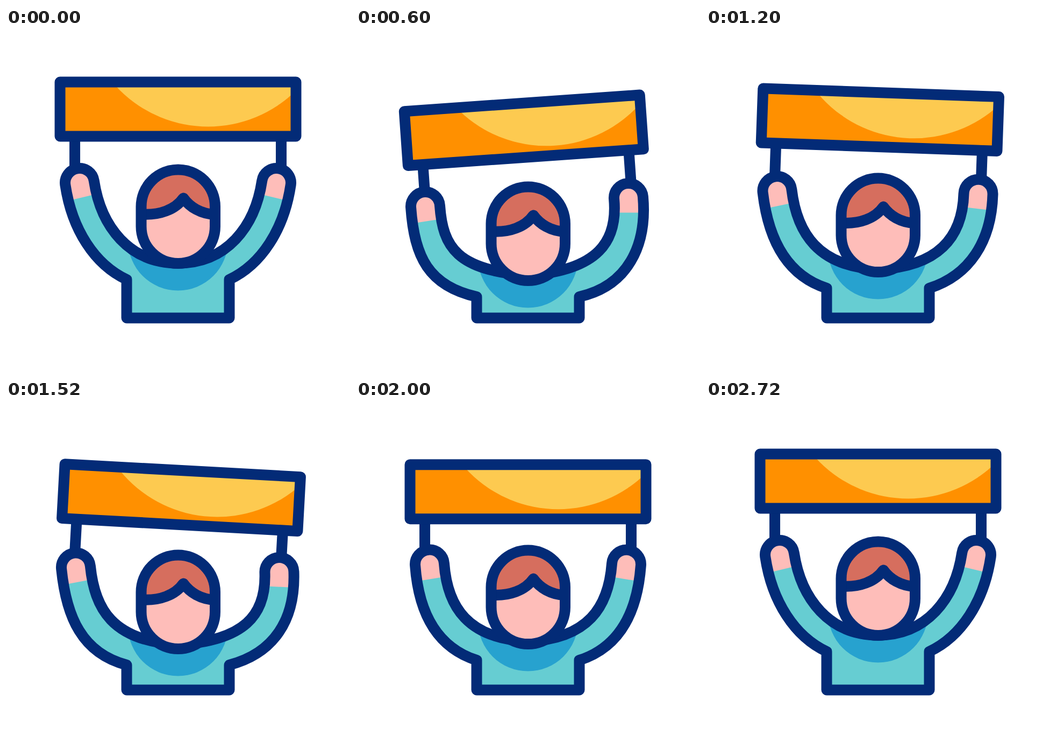
Write an HTML page that moves like this. It is 640 px wide and 640 px high and loops after 2800 ms.

```html
<!DOCTYPE html>
<html lang="en">
<head>
<meta charset="utf-8">
<title>Fan with banner</title>
<style>
  html, body { margin: 0; width: 100%; height: 100%; overflow: hidden; background: #fff; }
  svg { display: block; width: 100vw; height: 100vh; }
  .line { fill: none; stroke: #032b77; stroke-width: 20; stroke-linejoin: round; }
</style>
</head>
<body>
<svg viewBox="0 0 640 640">
  <defs>
    <path id="body"/>
    <clipPath id="inBody"><use href="#body"/></clipPath>
    <clipPath id="inBanner"><path d="M100.5 100.5h439v101h-439z"/></clipPath>
    <clipPath id="inHead"><rect x="251.5" y="263.5" width="137.5" height="174.5" rx="68.7"/></clipPath>
  </defs>

  <g id="banner">
    <path class="line" d="M128 201V262M512 201V262"/>
    <path fill="#ff9000" d="M100.5 100.5h439v101h-439z"/>
    <circle cx="376" cy="-49.5" r="233" fill="#fdca50" clip-path="url(#inBanner)"/>
    <path class="line" d="M100.5 100.5h439v101h-439z"/>
  </g>

  <g clip-path="url(#inBody)">
    <use href="#body" fill="#66cdd2"/>
    <circle id="collar" cx="320" cy="395.5" r="93" fill="#27a2cf"/>
    <rect id="leftHand" x="-40" y="-40" width="80" height="67.5" fill="#febdb9"/>
    <rect id="rightHand" x="-40" y="-40" width="80" height="67.5" fill="#febdb9"/>
  </g>
  <use href="#body" class="line"/>

  <g id="head">
    <g clip-path="url(#inHead)">
      <path fill="#febdb9" d="M240 250h160v200h-160z"/>
      <path class="line" style="fill:#d66e5e"
        d="M240 250V346.5H251.5C285 349 315 338 330 316.5C342 333 362 346 389 347H400V250z"/>
    </g>
    <rect class="line" x="251.5" y="263.5" width="137.5" height="174.5" rx="68.7"/>
  </g>
</svg>

<script>
const LOOP = 2800, START = 200, BOUNCE = 800, DROP = 32, BANNER_DROP = 39;
const $ = id => document.getElementById(id);
const mix = (a, b, k) => a + (b - a) * k;
const smooth = x => x * x * (3 - 2 * x);

// Hand pose: x, y, lean in degrees. The right hand is given mirrored.
const RAISED = [137, 288, 8.5];
const BOUNCES = [
  { tilt: -4, left: [129, 332, 4], right: [133, 316, -5] },
  { tilt: 4, left: [128, 318, 5], right: [130, 329, -5] },
  { tilt: 0, left: [137, 323, 0], right: [137, 323, 0] }
];

// Points from the waist corner around the hand to the neck.
function armPoints([x, y, lean], k) {
  const a = lean * Math.PI / 180, s = Math.sin(a), c = Math.cos(a);
  const outer = [x - 27 * c, y + 27 * s], inner = [x + 27 * c, y - 27 * s];
  const along = ([px, py], d) => [px + s * d, py + c * d];
  return [
    [224.5, 468 + DROP * k],
    [mix(165, 135, k), mix(440, 480, k)],
    along(outer, mix(84, 92, k)), outer,
    inner, along(inner, mix(87, 78, k)),
    [mix(230, 188, k), mix(437.5, 450.5, k)],
    [320, mix(437.5, 460.5, k)]
  ];
}

function bodyPath(left, right, k) {
  const l = armPoints(left, k);
  const r = armPoints(right, k).map(([x, y]) => [640 - x, y]);
  return `M224.5 539.5L${l[0]}C${l[1]} ${l[2]} ${l[3]}A27 27 0 0 1 ${l[4]}C${l[5]} ${l[6]} ${l[7]}` +
    `C${r[6]} ${r[5]} ${r[4]}A27 27 0 0 1 ${r[3]}C${r[2]} ${r[1]} ${r[0]}L415.5 539.5Z`;
}

const setTransform = (id, value) => $(id).setAttribute('transform', value);

function draw(time) {
  const beat = Math.max(0, time % LOOP - START) / BOUNCE;
  const index = Math.min(2, Math.floor(beat));
  const phase = Math.min(1, beat - index);
  const k = smooth(1 - Math.abs(2 * phase - 1));
  const bounce = BOUNCES[index];
  const pose = side => RAISED.map((v, i) => mix(v, bounce[side][i], k));
  const left = pose('left'), right = pose('right');

  $('body').setAttribute('d', bodyPath(left, right, k));
  setTransform('leftHand', `translate(${left[0]} ${left[1]}) rotate(${-left[2] - 5})`);
  setTransform('rightHand', `translate(${640 - right[0]} ${right[1]}) rotate(${right[2] + 5})`);
  setTransform('banner', `translate(0 ${BANNER_DROP * k}) rotate(${bounce.tilt * k} 320 261)`);
  for (const id of ['head', 'collar']) setTransform(id, `translate(0 ${DROP * k})`);
}

const began = performance.now();
function tick() {
  draw(performance.now() - began);
  requestAnimationFrame(tick);
}
tick();
</script>
</body>
</html>
```
